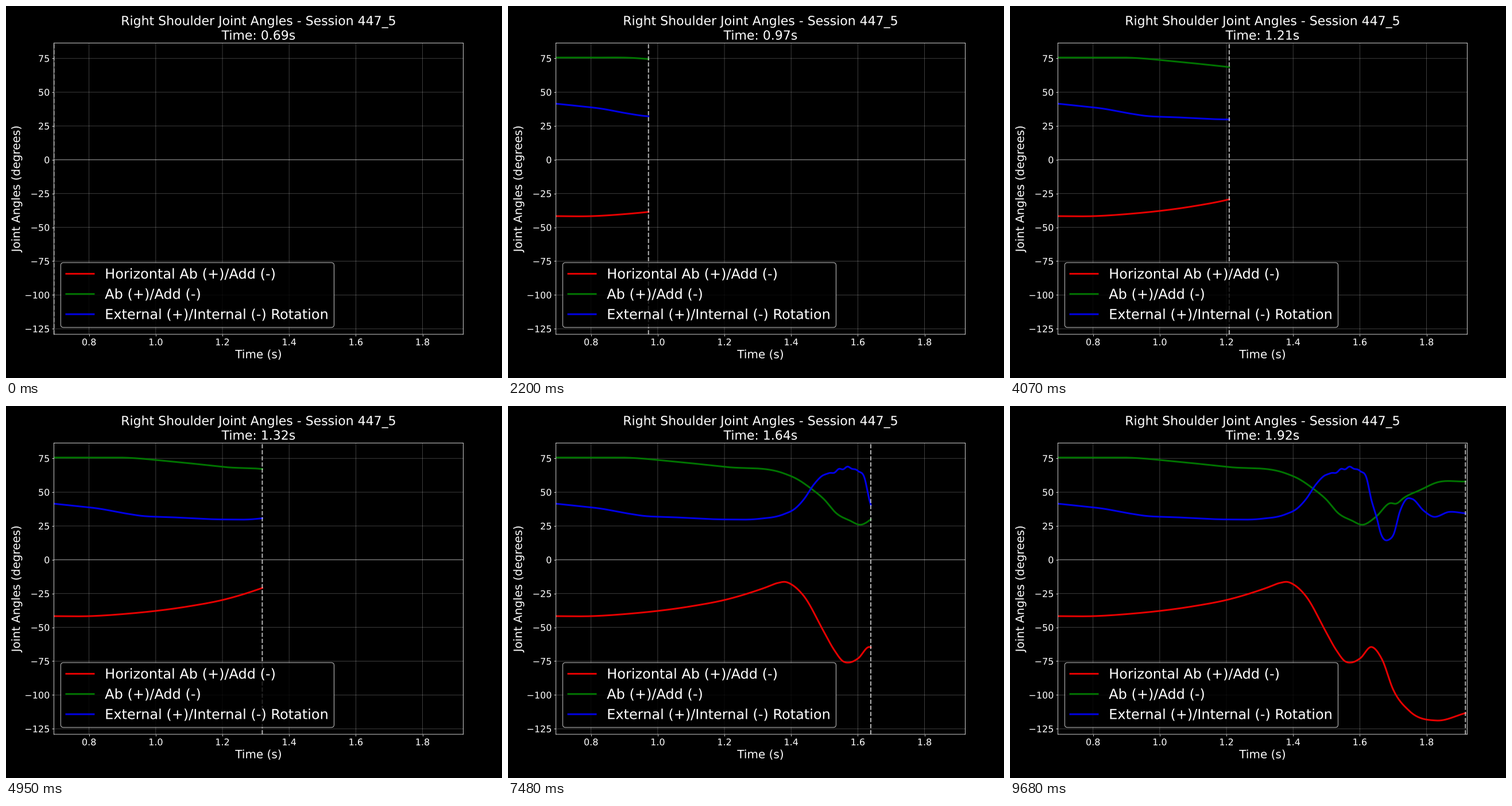
A matplotlib script that plays this animation: 864 by 648 pixels, repeating every 9790 ms.

```python
import numpy as np
import matplotlib.pyplot as plt
from matplotlib.patheffects import Normal
from matplotlib.animation import FuncAnimation

W, H, DPI = 864, 648, 72
RATE, STEP = 360, 5          # samples per second, samples per frame
FIRST, LAST = 250, 692
FRAMES, INTERVAL = 89, 110

# Turning points of each motion: (time in s, angle in degrees)
HORIZONTAL = [
    (.694, -41.7), (.80, -41.7), (.91, -40.0), (1.10, -34.4), (1.206, -29.4),
    (1.319, -20.9), (1.361, -17.1), (1.383, -16.4), (1.407, -19.2),
    (1.438, -26.8), (1.498, -53.1), (1.529, -66.7), (1.557, -75.3),
    (1.574, -76.0), (1.601, -72.9), (1.635, -64.5), (1.667, -73.9),
    (1.70, -96.0), (1.748, -111.7), (1.83, -118.9), (1.917, -113.4)]

ABDUCTION = [
    (.694, 75.6), (.82, 75.6), (.91, 75.5), (1.042, 72.8), (1.207, 68.6),
    (1.378, 63.9), (1.417, 59.8), (1.459, 52.8), (1.498, 44.9), (1.536, 34.3),
    (1.576, 29.0), (1.607, 25.9), (1.648, 31.7), (1.69, 41.8), (1.71, 41.6),
    (1.732, 45.8), (1.782, 51.7), (1.83, 57.1), (1.917, 57.9)]

ROTATION = [
    (.694, 41.5), (.76, 39.8), (.825, 38.0), (.911, 34.2), (.953, 32.6),
    (1.044, 31.5), (1.21, 29.8), (1.30, 30.2), (1.378, 33.7), (1.412, 37.9),
    (1.44, 45.3), (1.467, 55.3), (1.491, 61.7), (1.529, 64.8), (1.56, 68.0),
    (1.60, 65.6), (1.62, 60.6), (1.634, 44.9), (1.65, 31.7), (1.663, 19.4),
    (1.689, 15.1), (1.701, 18.6), (1.72, 35.6), (1.739, 44.7), (1.757, 45.0),
    (1.791, 36.4), (1.818, 32.0), (1.868, 35.4), (1.917, 34.3)]


def smooth(knots, t):
    """Cubic Hermite curve through the knots."""
    x, y = np.array(knots).T
    m = np.gradient(y, x)
    i = np.clip(np.searchsorted(x, t, side="right") - 1, 0, len(x) - 2)
    h = x[i + 1] - x[i]
    u = (t - x[i]) / h
    return ((1 + 2 * u) * (1 - u) ** 2 * y[i] + u * (1 - u) ** 2 * h * m[i]
            + u * u * (3 - 2 * u) * y[i + 1] + u * u * (u - 1) * h * m[i + 1])


def tremor(t):
    """Short ripple on the rotation plateau."""
    envelope = np.exp(-((t - 1.556) / 0.035) ** 2)
    return 0.9 * envelope * np.cos(2 * np.pi * (t - 1.542) / 0.028)


plt.style.use("dark_background")
# Unsnapped lines and outline text keep sub-pixel positions
plt.rcParams.update({"font.family": "DejaVu Sans", "path.snap": False,
                     "text.hinting": "none", "path.effects": [Normal()]})

fig = plt.figure(figsize=(W / DPI, H / DPI), dpi=DPI)
ax = fig.add_axes([83.35 / W, 1 - 571.9 / H, 713.2 / W, 507.3 / H])
ax.set_xlim(FIRST / RATE, LAST / RATE)
ax.set_ylim(-129.1, 86.3)
ax.set_xlabel("Time (s)", fontsize=20)
ax.set_ylabel("Joint Angles (degrees)", fontsize=20)
ax.tick_params(labelsize=16)
ax.grid(True, color="white", alpha=0.3, linewidth=0.8)
ax.axhline(0, color="white", alpha=0.5, linewidth=1)

times = np.arange(FIRST, LAST + 1) / RATE
curves = []
for label, color, angles in [
        ("Horizontal Ab (+)/Add (-)", "red", smooth(HORIZONTAL, times)),
        ("Ab (+)/Add (-)", "green", smooth(ABDUCTION, times)),
        ("External (+)/Internal (-) Rotation", "blue",
         smooth(ROTATION, times) + tremor(times))]:
    line, = ax.plot([], [], color=color, linewidth=3, alpha=0.9, label=label)
    curves.append((line, angles))
cursor = ax.axvline(times[0], color="white", linestyle="--", linewidth=2,
                    alpha=0.7)
ax.legend(loc="lower left", fontsize=24, facecolor="black",
          edgecolor="white", framealpha=0.8)


def update(frame):
    n = frame * STEP
    now = times[n]
    for line, angles in curves:
        line.set_data(times[:n + 1], angles[:n + 1])
    cursor.set_xdata([now, now])
    ax.set_title("Right Shoulder Joint Angles - Session 447_5\n"
                 f"Time: {now:.2f}s", fontsize=22)
    return []


anim = FuncAnimation(fig, update, frames=FRAMES, interval=INTERVAL,
                     init_func=lambda: update(0), repeat=True, repeat_delay=0)
plt.show()
```
